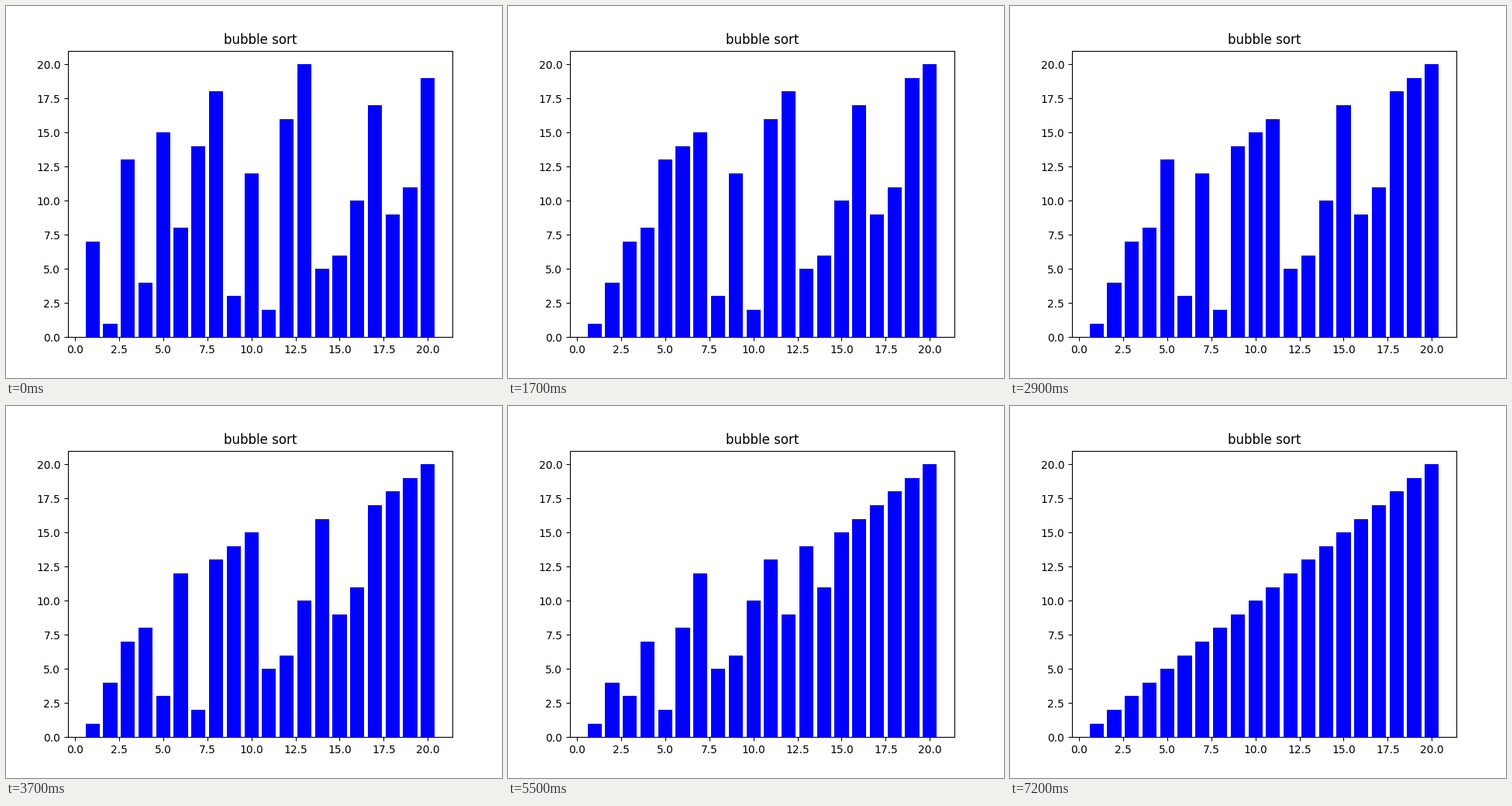
Write a matplotlib script that moves like this. It is 640 by 480 pixels and loops after 7300 ms.

```python
import matplotlib.pyplot as plt
from matplotlib.animation import FuncAnimation

START = [7, 13, 1, 4, 15, 8, 14, 18, 3, 12,
         2, 16, 20, 5, 6, 10, 17, 9, 11, 19]


def bubble_steps(values):
    """Return the list as it stands after every swap of a bubble sort."""
    values = list(values)
    steps = []
    for end in range(len(values) - 1, 0, -1):
        for i in range(end):
            if values[i] > values[i + 1]:
                values[i], values[i + 1] = values[i + 1], values[i]
                steps.append(values.copy())
    return steps


steps = bubble_steps(START)

fig, ax = plt.subplots(figsize=(6.4, 4.8), dpi=100)
bars = ax.bar(range(1, len(START) + 1), steps[0], color="blue")
ax.set_title("bubble sort")
ax.set_xlim(-0.39, 21.39)
ax.set_ylim(0, 21)


def draw(step):
    for bar, height in zip(bars, steps[step]):
        bar.set_height(height)
    return bars


anim = FuncAnimation(fig, draw, frames=len(steps), interval=100,
                     repeat=True, repeat_delay=0, blit=False)
plt.show()
```
